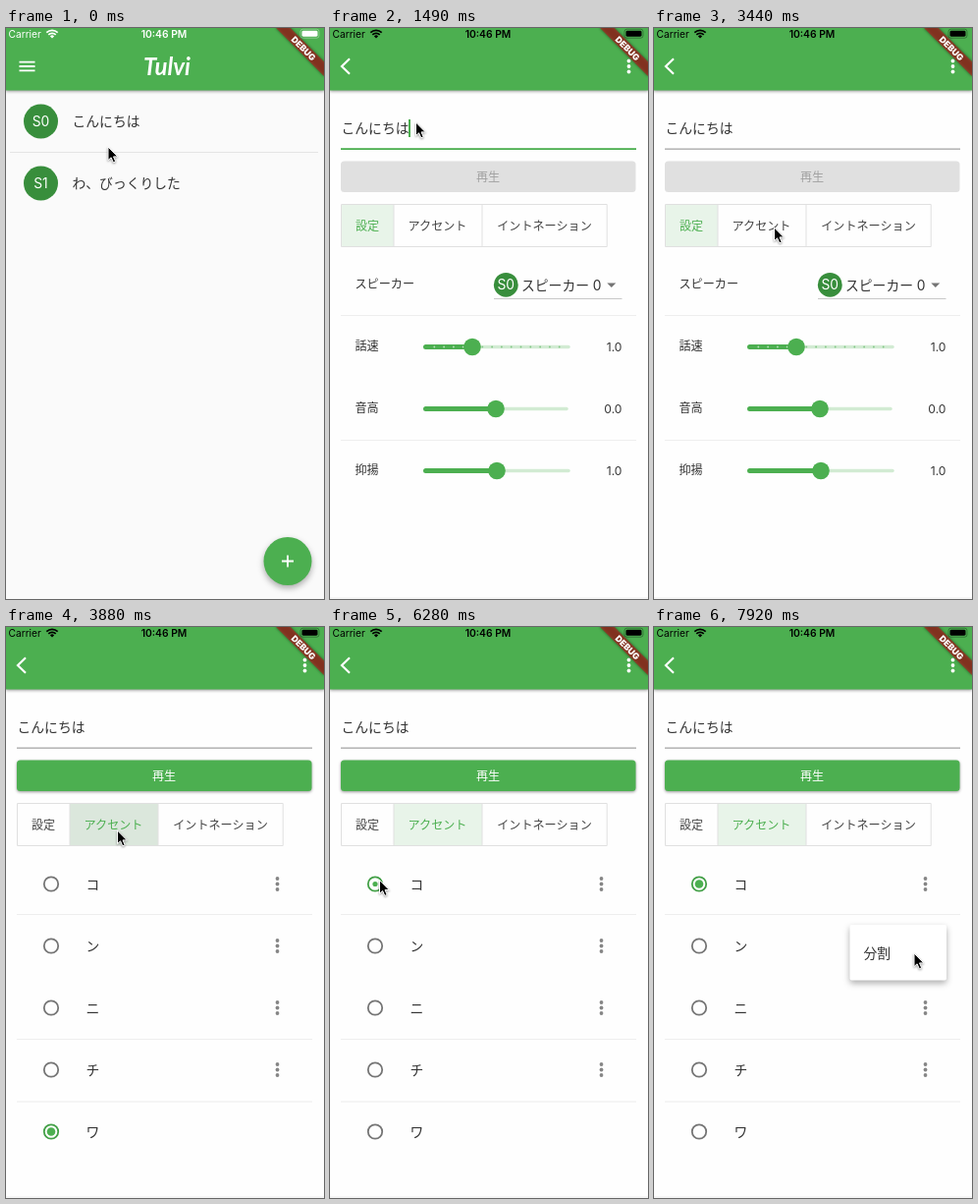
Recreate the animation shown at these times as an HTML page. Size 324 by 581 pixels, loop 8000 ms.

```html
<!DOCTYPE html>
<html lang="ja">
<meta charset="utf-8">
<style>
  html, body { margin: 0; height: 100%; overflow: hidden; background: #fafafa }
  svg { display: block; font-family: Inter, "Noto Sans CJK JP", "Noto Sans CJK", sans-serif; fill: #333 }
  .bar, .raised { filter: drop-shadow(0 1px 1.5px rgba(0, 0, 0, .4)) }
  .fab, .menu { filter: drop-shadow(0 3px 3px rgba(0, 0, 0, .32)) }
  .title { font: italic 700 24px Lato, sans-serif }
  #pointer { filter: drop-shadow(0 1px 1px rgba(0, 0, 0, .4)) }
</style>
<svg id="stage" width="324" height="581" viewBox="0 0 324 581"></svg>
<script>
const GREEN = '#4caf50', DARK = '#388e3c', GREY = '#757575';
const LOOP = 8000, TICK = 149.4;

// Text centred vertically on cy
const text = (x, cy, size, str, attrs = '') =>
  `<text x="${x}" y="${cy + size * .37}" font-size="${size}" ${attrs}>${str}</text>`;
const mid = 'text-anchor="middle"';
const rect = (x, y, w, h, fill, attrs = '') =>
  `<rect x="${x}" y="${y}" width="${w}" height="${h}" fill="${fill}" ${attrs}/>`;
const circle = (x, y, r, fill, attrs = '') =>
  `<circle cx="${x}" cy="${y}" r="${r}" fill="${fill}" ${attrs}/>`;
const path = (d, stroke, width, attrs = '') =>
  `<path d="${d}" fill="none" stroke="${stroke}" stroke-width="${width}" ${attrs}/>`;
const kebab = (x, y, fill) => [-5.5, 0, 5.5].map(d => circle(x, y + d, 1.9, fill)).join('');
const avatar = (x, y, r, label) =>
  circle(x, y, r, DARK) + text(x, y, 13.8, label, `${mid} fill="#fff"`);
const divider = y => rect(11, y, 301, 1, '#eee');

const listPage = () => `<g id="list">
  ${rect(0, 0, 324, 581, '#fafafa')}
  ${rect(0, 0, 324, 63.5, GREEN, 'class="bar"')}
  ${path('M13.5 34.7h16M13.5 39h16M13.5 43.4h16', '#fff', 1.8)}
  <text class="title" x="164" y="48" ${mid} fill="#fff">Tulvi</text>
  ${['こんにちは', 'わ、びっくりした'].map((s, i) =>
    avatar(35.5, 95 + 63 * i, 17.5, 'S' + i) + text(67.5, 95 + 63 * i, 13.8, s)).join('')}
  ${rect(4, 126, 314, 1, '#e4e4e4')}
  ${circle(287, 542.5, 24.5, GREEN, 'class="fab"')}
  ${path('M281 542.5h12M287 536.5v12', '#fff', 1.8)}
</g>`;

function slider(label, y, end, thumb, value, ticks) {
  let dots = '';
  for (let i = 1; i < ticks; i++) {
    const x = 96.5 + 9.8 * i;
    dots += circle(x, y, .9, x < thumb ? '#b5deb7' : '#83c786');
  }
  return text(25.5, y - 1, 12.1, label)
    + path(`M97 ${y}H${end - 2}`, '#d2ebd3', 3.5, 'stroke-linecap="round"')
    + path(`M97.5 ${y}H${thumb}`, GREEN, 5, 'stroke-linecap="round"')
    + dots + circle(thumb, y, 8.8, GREEN)
    + text(297.5, y, 12.1, value, 'text-anchor="end"');
}

const settings = () => `<g id="settings">
  ${text(25.5, 260.5, 12.1, 'スピーカー')}
  ${avatar(179.3, 261.3, 12.4, 'S0')}
  ${text(195, 261.5, 13.8, 'スピーカー 0')}
  <path d="M282.3 259.5h9l-4.5 4.6z" fill="${GREY}"/>
  ${rect(167, 275, 130.5, 1, '#c8c8c8')}
  ${slider('話速', 324.5, 245, 145, '1.0', 15)}
  ${slider('音高', 387.5, 243, 169, '0.0', 0)}
  ${slider('抑揚', 450.5, 245, 170, '1.0', 0)}
</g>`;

const accents = () => `<g id="accents">
  ${[...'コンニチワ'].map((kana, i) => {
    const y = 261.5 + 63 * i;
    return circle(46, y, 7.2, 'none', `class="ring" stroke-width="1.8"`)
      + circle(46, y, 4.3, GREEN, 'class="dot"')
      + text(81.5, y, 13.8, kana) + (i < 4 ? kebab(276.5, y, '#868686') : '');
  }).join('')}
  ${divider(482.5)}
</g>`;

const editPage = () => `<g id="edit">
  ${rect(0, 0, 324, 581, '#fefefe')}${rect(0, 579, 324, 2, '#f6f6f6')}
  ${rect(0, 0, 324, 63.5, GREEN, 'class="bar"')}
  ${path('M20 31.2L12 39l8 7.8', '#fff', 2.2)}
  ${kebab(304.5, 39, '#fff')}
  ${text(11.5, 101.5, 13.8, 'こんにちは')}
  ${rect(80, 93, 2, 18, GREEN, 'id="caret"')}
  <rect id="underline" x="11" width="301"/>
  <g id="play">${rect(11, 135.5, 300.5, 31.5, 'currentColor', 'rx="3.5"')}</g>
  ${text(161, 151.5, 12.1, '再生', `id="playLabel" font-weight="500" ${mid}`)}
  <rect id="selected" y="180" height="42.5" fill="#e8f4e9"/>
  ${rect(65, 180, 90, 42.5, '#000', 'id="ripple"')}
  ${path('M11.5 179.5h270.7v43h-270.7zM65 179.5v43M155 179.5v43', '#e0e0e0', 1)}
  ${[['設定', 38], ['アクセント', 109.5], ['イントネーション', 218.5]].map(([s, x]) =>
    text(x, 201.3, 12.1, s, `class="tab" ${mid}`)).join('')}
  ${settings()}${accents()}${divider(292)}${divider(419)}
  <g id="menu"><g class="menu">${rect(199.5, 303, 98.5, 56.5, '#fff', 'rx="2"')}</g>
    ${text(213.5, 331.5, 13.8, '分割')}</g>
</g>`;

const statusBar = () => `<g id="status">
  ${text(2.5, 6, 10.2, 'Carrier')}
  ${path('M41.3 4.7a8.2 8.2 0 0 1 11.4 0M43.3 6.9a5.3 5.3 0 0 1 7.4 0', 'currentColor', 1.7)}
  <path d="M47 10.6l-2.1-2.2a3 3 0 0 1 4.2 0z"/>
  ${text(161, 6, 10.3, '10:46 PM', `${mid} font-weight="600"`)}
  ${rect(300, 1.2, 19, 9, 'none', 'rx="2.5" stroke="currentColor" stroke-opacity=".4" stroke-width=".8"')}
  ${rect(301.5, 2.7, 16, 6, 'currentColor', 'rx="1.4"')}
</g>`;

const banner = `<g transform="translate(324) rotate(45) scale(.864)">
  ${rect(-40, 28, 80, 12, '#000', 'opacity=".5" style="filter:blur(2px)"')}
  ${rect(-40, 28, 80, 12, '#b71c1c', 'opacity=".63"')}
  ${text(0, 34, 10.2, 'DEBUG', `${mid} fill="#fff" font-weight="900"`)}
</g>`;

const pointer = `<path id="pointer" stroke="#fff" stroke-width="1" stroke-linejoin="round"
  d="M.5 0V13.6L3.6 10.8 5.8 15.8 8.2 14.8 6 9.9H10.3Z" fill="#000"/>`;

const stage = document.getElementById('stage');
stage.innerHTML = listPage() + editPage() + statusBar() + banner + pointer;
const $ = id => document.getElementById(id);
const all = name => [...stage.querySelectorAll('.' + name)];
const set = (el, attrs) => { for (const k in attrs) el.setAttribute(k, attrs[k]); };
const show = (id, on) => $(id).style.display = on ? '' : 'none';
const tabs = all('tab'), rings = all('ring'), dots = all('dot');
const clamp = v => Math.max(0, Math.min(1, v));

// Pointer stops: tick, x, y
const stops = [
  [0, 103.5, 121], [1, 97, 111], [3, 87, 96], [16, 87, 96], [18, 193, 171], [19, 193, 171],
  [23, 122, 203], [26, 113, 207], [31, 113, 207], [35, 81.5, 246.5], [37, 51.5, 257],
  [41, 51.5, 257], [44, 47, 259], [45, 47, 259], [47, 219, 348], [49, 259, 326],
  [50, 259, 326], [53, 264.5, 332]
];
function pointerAt(n) {
  const i = Math.max(1, stops.findIndex(s => s[0] >= n));
  const [a, ax, ay] = stops[i - 1], [b, bx, by] = stops[i];
  const k = (n - a) / (b - a);
  return [ax + (bx - ax) * k, ay + (by - ay) * k];
}

function draw(time) {
  const n = Math.min(53, Math.floor(time / TICK + .05));
  const editing = n >= 10, focused = n < 22, accent = n >= 26, chosen = n >= 42 ? 0 : 4;

  show('list', !editing);
  show('edit', editing);
  set($('status'), { fill: editing ? '#000' : '#fff', color: editing ? '#000' : '#fff' });

  $('caret').style.opacity = focused ? clamp(.5 + Math.cos((n - 10) / 6.7 * 2 * Math.PI)) : 0;
  set($('underline'), focused
    ? { y: 122.2, height: 1.8, fill: GREEN } : { y: 122.6, height: 1, fill: '#8c8c8c' });

  set($('play'), { color: accent ? GREEN : '#e0e0e0', class: accent ? 'raised' : '' });
  set($('playLabel'), { fill: accent ? '#fff' : '#a0a0a0' });

  set($('selected'), accent ? { x: 65, width: 90 } : { x: 11.5, width: 53.5 });
  $('ripple').style.opacity = { 24: .03, 25: .06, 26: .055 }[n] || 0;
  tabs.forEach((tab, i) => set(tab, { fill: i === +accent ? GREEN : '#444' }));
  show('settings', !accent);
  show('accents', accent);

  rings.forEach((ring, i) => {
    set(ring, { stroke: i === chosen ? '#43a047' : GREY });
    set(dots[i], { r: i === chosen ? 4.3 * (n === 42 ? .6 : 1) : 0 });
  });

  $('menu').style.opacity = clamp((n - 50) / 2.5);
  set($('pointer'), { transform: `translate(${pointerAt(n)})` });
}

function frame() {
  draw(performance.now() % LOOP);
  requestAnimationFrame(frame);
}
frame();
</script>
</html>
```
